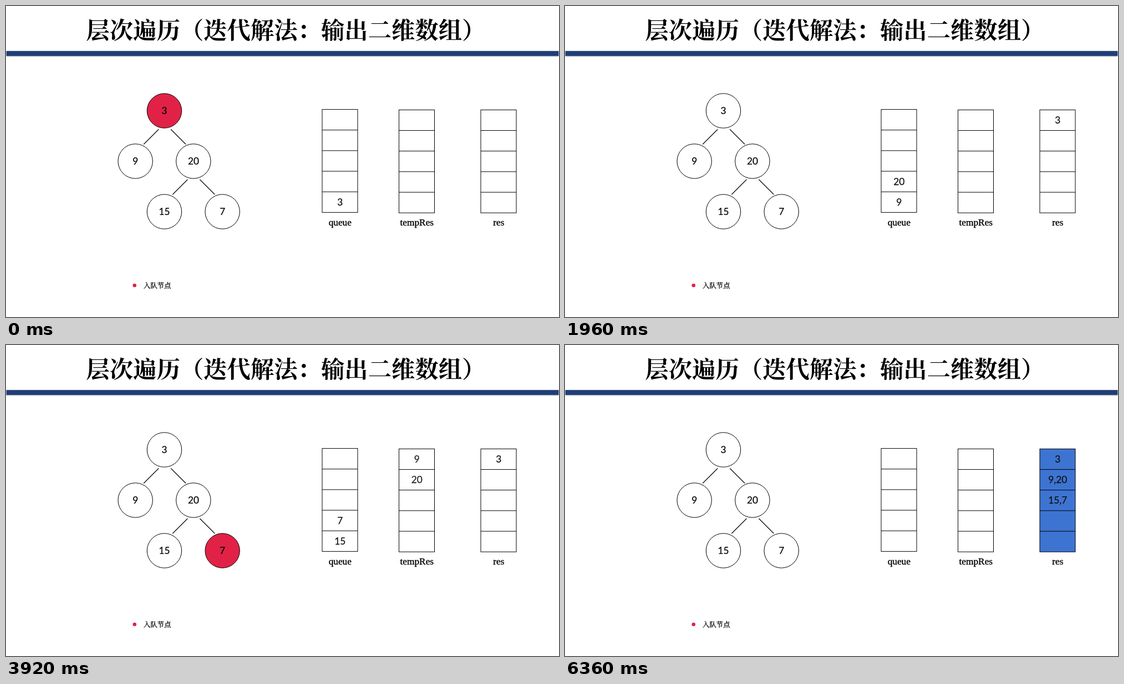
Recreate the animation shown at these times as an HTML page with a canvas. Size 997 px wide and 561 px high, loop 6.88 s.

```html
<!DOCTYPE html>
<html lang="zh-CN">
<head>
<meta charset="utf-8">
<title>层次遍历</title>
<style>
html, body { margin: 0; width: 100%; height: 100%; overflow: hidden; background: #fff; }
canvas { display: block; width: 997px; height: 561px; }
</style>
</head>
<body>
<canvas id="stage" width="997" height="561"></canvas>
<script>
const ctx = document.getElementById('stage').getContext('2d');
const LOOP = 6880;
const RED = '#e12246', BLUE = '#3d74d2', NAVY = '#1f3e79';
const CJK = '"Noto Serif CJK SC", "Noto Sans CJK SC", "Noto Sans CJK", serif';
const NUM = '17.3px Lato, sans-serif';
const LABEL = '17.3px "Liberation Serif", serif';

const nodes = [
  ['3', 285.5, 189], ['9', 233.2, 280], ['20', 337.9, 280],
  ['15', 285.5, 371], ['7', 390.2, 371]
];

// Queue fills from the bottom, the two result columns from the top.
const steps = [
  { at: 0, hot: '3', queue: ['3'], temp: [], res: [] },
  { at: 520, queue: [], temp: ['3'], res: [] },
  { at: 1000, hot: '9', queue: ['9'], temp: ['3'], res: [] },
  { at: 1480, hot: '20', queue: ['9', '20'], temp: ['3'], res: [] },
  { at: 1960, queue: ['9', '20'], temp: [], res: ['3'] },
  { at: 2440, queue: ['20'], temp: ['9'], res: ['3'] },
  { at: 2960, queue: [], temp: ['9', '20'], res: ['3'] },
  { at: 3440, hot: '15', queue: ['15'], temp: ['9', '20'], res: ['3'] },
  { at: 3920, hot: '7', queue: ['15', '7'], temp: ['9', '20'], res: ['3'] },
  { at: 4400, queue: ['15', '7'], temp: [], res: ['3', '9,20'] },
  { at: 4920, queue: ['7'], temp: ['15'], res: ['3', '9,20'] },
  { at: 5400, queue: [], temp: ['15', '7'], res: ['3', '9,20'] },
  { at: 5880, queue: [], temp: [], res: ['3', '9,20', '15,7'] },
  { at: 6360, queue: [], temp: [], res: ['3', '9,20', '15,7'], done: true }
];

function text(str, x, y, font, { align = 'center', color = '#000', stroke = 0 } = {}) {
  ctx.font = font;
  ctx.textAlign = align;
  ctx.fillStyle = color;
  ctx.fillText(str, x, y);
  if (stroke) {
    ctx.lineWidth = stroke;
    ctx.strokeStyle = color;
    ctx.strokeText(str, x, y);
  }
}

function line(x1, y1, x2, y2) {
  ctx.beginPath();
  ctx.moveTo(x1, y1);
  ctx.lineTo(x2, y2);
  ctx.stroke();
}

function disc(x, y, r, fill) {
  ctx.beginPath();
  ctx.arc(x, y, r, 0, Math.PI * 2);
  ctx.fillStyle = fill;
  ctx.fill();
}

function pen(width = 1) {
  ctx.lineWidth = width;
  ctx.strokeStyle = '#000';
}

function header() {
  text('层次遍历（迭代解法：输出二维数组）', 144.5, 58.8, 'bold 42.35px ' + CJK, { align: 'left' });
  ctx.save();
  ctx.shadowColor = 'rgba(0, 0, 0, 0.4)';
  ctx.shadowBlur = 2;
  ctx.shadowOffsetY = 1;
  ctx.fillStyle = NAVY;
  ctx.fillRect(0.7, 81.2, 995.6, 8.9);
  ctx.restore();
}

function tree(hot) {
  pen(1.15);
  for (const [x, y] of [[286.2, 222.5], [338.4, 313]]) {
    line(x - 11, y, x - 38, y + 27);
    line(x + 11, y, x + 38, y + 27);
  }
  for (const [value, x, y] of nodes) {
    disc(x, y, 31.2, value === hot ? RED : '#fff');
    pen();
    ctx.stroke();
    text(value, x, y + 6, NUM, { stroke: 0.2 });
  }
}

function column(name, x, top, values, { fromBottom = false, fill = '#fff', ink = '#111' } = {}) {
  const left = x - 32, width = 64, cell = 37.15;
  ctx.fillStyle = fill;
  ctx.fillRect(left, top, width, cell * 5);
  pen();
  ctx.strokeRect(left, top, width, cell * 5);
  for (let i = 1; i < 5; i++) line(left, top + i * cell, left + width, top + i * cell);
  values.forEach((value, i) => {
    const row = fromBottom ? 4 - i : i;
    text(value, x + 0.2, 212 + row * 37, NUM, { color: ink, stroke: 0.25 });
  });
  text(name, x + 0.3, 396, LABEL, { stroke: 0.35 });
}

function draw(step) {
  ctx.fillStyle = '#fff';
  ctx.fillRect(0, 0, 997, 561);
  header();
  tree(step.hot);
  column('queue', 602, 186.6, step.queue, { fromBottom: true });
  column('tempRes', 740.5, 187.4, step.temp, { ink: '#222' });
  column('res', 888, 187.4, step.res, step.done ? { fill: BLUE } : {});
  disc(231.8, 504, 3.3, RED);
  text('入队节点', 248, 508.8, '12.4px ' + CJK, { align: 'left', stroke: 0.3 });
}

const start = performance.now();

function tick() {
  const t = (performance.now() - start) % LOOP;
  draw(steps.filter(s => s.at <= t).pop());
  requestAnimationFrame(tick);
}
tick();
</script>
</body>
</html>
```
